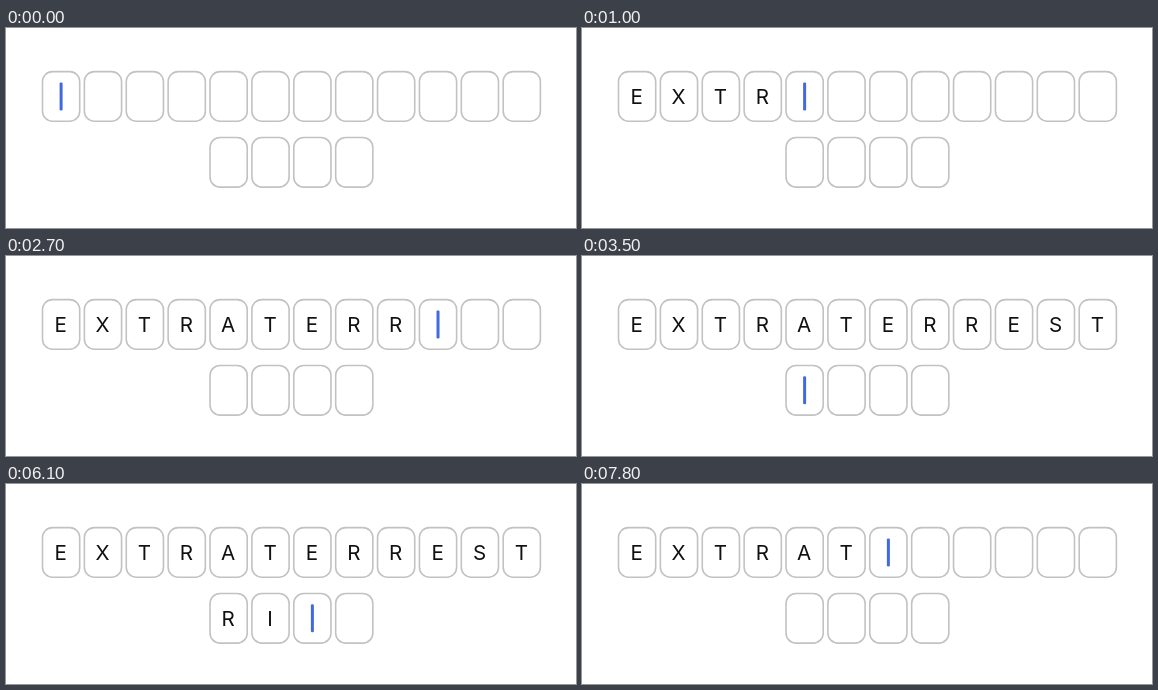
An HTML page that plays this animation: 570 by 200 pixels, repeating every 8000 ms.

```html
<!DOCTYPE html>
<html>
<head>
<meta charset="utf-8">
<style>
html, body { margin: 0; width: 100%; height: 100%; overflow: hidden; background: #fff; }
svg { display: block; }
rect.cell { fill: #fff; stroke: #c2c2c2; stroke-width: 1.6; }
text { font: 20.6px Inter, "Liberation Sans", sans-serif; text-anchor: middle; fill: #111; }
#caret { fill: #4169e1; }
</style>
</head>
<body>
<svg id="stage" width="570" height="200" viewBox="0 0 570 200"></svg>
<script>
const WORD = "EXTRATERRESTRIAL", PER_ROW = 12, LOOP = 8000, TICK = 100;
const stage = document.getElementById("stage");

function add(tag, attrs, content = "") {
  const el = document.createElementNS("http://www.w3.org/2000/svg", tag);
  for (const key in attrs) el.setAttribute(key, attrs[key]);
  el.textContent = content;
  stage.append(el);
  return el;
}

// The second row is centred below the first.
function place(i) {
  const second = i >= PER_ROW;
  return { x: 55.1 + 41.88 * (second ? i - 8 : i), y: second ? 134.3 : 68.4 };
}

const letters = [...WORD].map((char, i) => {
  const { x, y } = place(i);
  add("rect", { class: "cell", x: x - 18.6, y: y - 24.8, width: 37.2, height: 49.6, rx: 10 });
  return add("text", { x: x - 0.4, y: y + 7.4 }, char);
});
const caret = add("rect", { id: "caret", width: 3, height: 28, rx: 1.2 });

// Typing pace: [ms, letters], linear in between
const pace = [[0, 0], [200, 1], [600, 2], [1000, 4], [1600, 5], [2000, 6],
              [2700, 9], [4000, 14], [4300, 15], [4700, 16]];
const DELETE = 5700, REPEAT = 6100;

function typed(t) {
  if (t >= REPEAT) return Math.max(6, 14 - Math.floor((t - REPEAT) / 200));
  if (t >= DELETE) return 15;
  const next = pace.findIndex(([time]) => time > t);
  if (next < 0) return WORD.length;
  const [t0, n0] = pace[next - 1], [t1, n1] = pace[next];
  return Math.floor(n0 + (n1 - n0) * (t - t0) / (t1 - t0));
}

// Blinks while the word is complete, and hides just before a quick key press.
function caretHidden(t) {
  if (typed(t) === WORD.length) return (t - 4200) % 700 < 300;
  return t < 4000 && typed(t + TICK) > typed(t);
}

function draw(now) {
  const t = Math.floor(now % LOOP / TICK) * TICK;
  const count = typed(t);
  letters.forEach((el, i) => el.setAttribute("visibility", i < count ? "visible" : "hidden"));

  const full = count === WORD.length;
  const { x, y } = place(full ? count - 1 : count);
  caret.setAttribute("x", x - 1.5 + (full ? 5.8 : 0));
  caret.setAttribute("y", y - 14);
  caret.setAttribute("visibility", caretHidden(t) ? "hidden" : "visible");
}

const start = performance.now();
function frame() {
  draw(performance.now() - start);
  requestAnimationFrame(frame);
}
frame();
</script>
</body>
</html>
```
